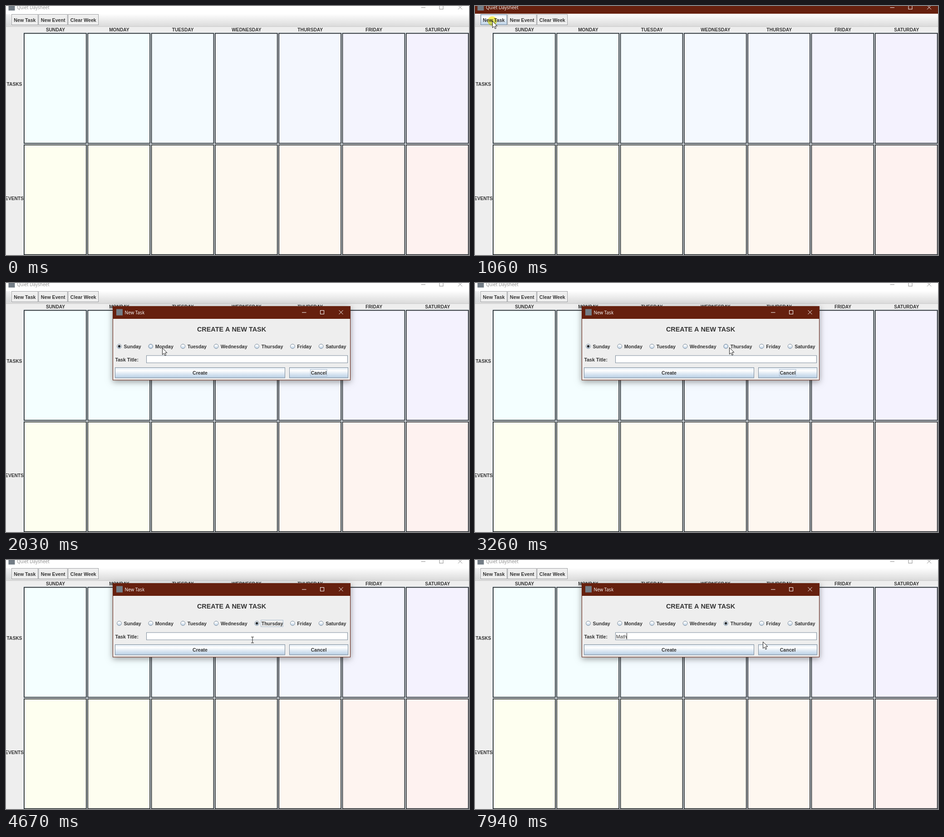
Recreate the animation shown at these times as an HTML page with a canvas. Size 1020x549 px, loop 8 s.

```html
<!DOCTYPE html>
<html lang="en">
<head>
<meta charset="utf-8">
<title>Weekly planner</title>
<style>
  html, body { margin: 0; width: 100%; height: 100%; overflow: hidden; background: #eee; }
  canvas { display: block; width: 1020px; height: 549px; }
</style>
</head>
<body>
<canvas id="stage"></canvas>
<script>
const W = 1020, H = 549, LOOP = 8000;
const canvas = document.getElementById('stage');
const ctx = canvas.getContext('2d');
const dpr = window.devicePixelRatio || 1;
canvas.width = W * dpr;
canvas.height = H * dpr;

const SANS = '"Liberation Sans", Arial, sans-serif';
const BOLD = 'bold 10.6px ' + SANS;
const CAPS = 'bold 10.2px ' + SANS;
const HEADING = 'bold 14.4px ' + SANS;
const PLAIN = '10.6px ' + SANS;
const TITLE = '10px "Open Sans", "Noto Sans", sans-serif';
const INK = '#333', EDGE = '#7a8a99', FACE = '#eee', BAR = '#66200e', FOCUS = '#a9bccf';
const DAYS = ['Sunday', 'Monday', 'Tuesday', 'Wednesday', 'Thursday', 'Friday', 'Saturday'];

// Pointer moves: start and end time, then where it goes
const ENTRY = { x: 975, y: 570 };
const MOVES = [
  { start: 190, end: 990, x: 38, y: 33 },
  { start: 1350, end: 1890, x: 344, y: 143 },
  { start: 2290, end: 2830, x: 537, y: 143 },
  { start: 3050, end: 3260, x: 560, y: 142 },
  { start: 3310, end: 3580, x: 582, y: 137 },
  { start: 3730, end: 4000, x: 461, y: 137 },
  { start: 4330, end: 4470, x: 598, y: 127 },
  { start: 4540, end: 4670, x: 543, y: 176 },
  { start: 5060, end: 5330, x: 634, y: 180 }
];
const STEP = 72;
const OPEN = 1160, PICK = 3380, ENTER = 4870, TYPE = 7360;
const PRESSES = [OPEN - 100, PICK, ENTER];
const PRESS_TIME = 95;

const pressed = (t, at) => t >= at && t < at + (at < OPEN ? 100 : PRESS_TIME);
const mix = (a, b, p) => a + (b - a) * p;
const smooth = p => p * p * (3 - 2 * p);

function pointer(t) {
  let pos = ENTRY;
  for (const m of MOVES) {
    if (t < m.start) break;
    const n = Math.round((m.end - m.start) / STEP);
    const k = Math.min(n, Math.floor((t - m.start) / (m.end - m.start) * n + 0.01));
    const p = (k + 1) / (n + 1);
    const e = (p + smooth(p)) / 2;
    pos = { x: mix(pos.x, m.x, e), y: mix(pos.y, m.y, e) };
  }
  return pos;
}

const inside = (p, x, y, w, h) => p.x >= x && p.x <= x + w && p.y >= y && p.y <= y + h;

function rect(x, y, w, h, fill) {
  ctx.fillStyle = fill;
  ctx.fillRect(x, y, w, h);
}

function frame(x, y, w, h, color, width = 1) {
  ctx.strokeStyle = color;
  ctx.lineWidth = width;
  ctx.strokeRect(x, y, w, h);
}

function disc(x, y, r, fill) {
  ctx.beginPath();
  ctx.arc(x, y, r, 0, Math.PI * 2);
  ctx.fillStyle = fill;
  ctx.fill();
}

function ring(x, y, r, color, width = 1) {
  ctx.beginPath();
  ctx.arc(x, y, r, 0, Math.PI * 2);
  ctx.strokeStyle = color;
  ctx.lineWidth = width;
  ctx.stroke();
}

function line(x1, y1, x2, y2, color) {
  ctx.strokeStyle = color;
  ctx.lineWidth = 1;
  ctx.beginPath();
  ctx.moveTo(x1, y1);
  ctx.lineTo(x2, y2);
  ctx.stroke();
}

function text(s, x, y, font, color = INK, align = 'left') {
  ctx.font = font;
  ctx.fillStyle = color;
  ctx.textAlign = align;
  ctx.fillText(s, x, y);
}

function widthOf(s, font) {
  ctx.font = font;
  return ctx.measureText(s).width;
}

function gradient(y1, y2, stops) {
  const g = ctx.createLinearGradient(0, y1, 0, y2);
  for (const at in stops) g.addColorStop(+at, stops[at]);
  return g;
}

const glossy = (y1, y2) =>
  gradient(y1, y2, { 0: '#dde8f3', 0.3: '#fff', 0.6: '#dde8f3', 1: '#b8cfe5' });

function caption(x, y, label, right, color) {
  rect(x, y - 7, 14, 14, '#737d86');
  text(label, x + 18.5, y + 4, TITLE, color);
  line(right - 86, y + 0.5, right - 76.5, y + 0.5, color);
  frame(right - 45.5, y - 4, 8, 8, color);
  line(right - 4.5, y - 4.5, right + 4.5, y + 4.5, color);
  line(right + 4.5, y - 4.5, right - 4.5, y + 4.5, color);
}

function toolbar(cur) {
  rect(0, 17, W, 28, gradient(17, 45, { 0: '#fff', 1: '#dadada' }));
  rect(0, 45, W, 1, '#ccc');
  for (let row = 0; row < 14; row++) {
    for (let x = (row % 2) * 1.8; x < 10; x += 3.6) {
      const y = 18.5 + row * 1.8;
      rect(x, y, 1, 1, '#a3aab2');
      rect(x + 0.9, y + 0.9, 0.9, 0.9, '#fff');
    }
  }
  let x = 12.5;
  for (const label of ['New Task', 'New Event', 'Clear Week']) {
    const w = widthOf(label, BOLD) + 9.7;
    const hot = inside(cur, x, 18, w, 24);
    rect(x, 18.5, w, 23, hot ? glossy(18, 42) : FACE);
    frame(x + 1, 19.5, w - 2, 21, hot ? '#b8cfe5' : '#f8f8f8');
    frame(x, 18.5, w, 23, hot ? EDGE : '#999b9e');
    text(label, x + w / 2, 35, BOLD, INK, 'center');
    x += w + 1.7;
  }
}

function cell(x, y, h, fill) {
  rect(x - 1, y - 1, 141, h + 2, '#e6eef4');
  rect(x, y, 138.8, h, fill);
  frame(x + 0.9, y + 0.9, 137, h - 1.8, '#23292d', 1.8);
}

function week() {
  DAYS.forEach((day, i) => {
    const x = 39 + 140.3 * i, p = i / 6;
    text(day.toUpperCase(), x + 70, 56, CAPS, INK, 'center');
    cell(x, 59.4, 244.2, `rgb(244, ${mix(256, 242, p)}, ${mix(255, 254, p)})`);
    cell(x, 305.4, 243.8, `rgb(254, ${mix(256, 242, p)}, 240)`);
  });
  text('TASKS', 18.5, 176, CAPS, INK, 'center');
  text('EVENTS', 18.5, 428, CAPS, INK, 'center');
}

function radio(x, y, on, hot) {
  disc(x, y, 4.9, glossy(y - 5, y + 5));
  if (hot) ring(x, y, 3.7, '#b8cfe5', 1.5);
  ring(x, y, 4.9, EDGE);
  if (on) disc(x, y, 2.8, '#262a2e');
}

function dayChoice(t, cur) {
  const chosen = DAYS[t < PICK + PRESS_TIME ? 0 : 4];
  let x = 249.5;
  for (const day of DAYS) {
    const w = widthOf(day, BOLD);
    radio(x, 139.6, day === chosen, inside(cur, x - 7, 131, w + 17, 18));
    text(day, x + 10, 144, BOLD);
    if (day === 'Thursday' && t >= PICK && t < ENTER) frame(x + 9, 132.5, w + 1, 14.5, FOCUS);
    x += w + 31;
  }
}

function pushButton(label, x, w) {
  rect(x, 186, w, 23.5, glossy(186, 209.5));
  frame(x + 0.5, 186.5, w - 1, 22.5, EDGE);
  text(label, x + w / 2, 202, BOLD, INK, 'center');
}

function titleField(t) {
  text('Task Title:', 240.5, 172.5, BOLD);
  rect(309, 159.5, 444, 17, '#fff');
  frame(309.5, 160, 443, 16, EDGE);

  const pause = 330, beat = 125;
  const rest = t - TYPE - pause;
  const count = t < TYPE ? 0 : rest < 0 ? 1 : 2 + Math.floor(rest / beat);
  const word = 'Math'.slice(0, count);
  text(word, 310.8, 172.5, PLAIN);

  const blink = Math.floor((t - ENTER) / 505) % 2 === 0;
  if (t >= TYPE || (t >= ENTER && blink)) {
    rect(Math.round(310.7 + widthOf(word, PLAIN)), 161, 1, 14, INK);
  }
}

function dialog(t, cur) {
  ctx.save();
  ctx.shadowColor = 'rgba(0,0,0,.4)';
  ctx.shadowBlur = 13 * dpr;
  ctx.shadowOffsetY = 3 * dpr;
  rect(235, 51, 524, 163.5, BAR);
  ctx.restore();
  rect(236, 79, 522, 134.5, FACE);
  caption(243, 64.5, 'New Task', 738, '#fff');
  text('CREATE A NEW TASK', 497, 107, HEADING, INK, 'center');
  dayChoice(t, cur);
  titleField(t);
  pushButton('Create', 240, 375);
  pushButton('Cancel', 624, 130);
  if (t < PICK) frame(670.5, 190.5, 36.5, 15, FOCUS);
}

function arrow(x, y) {
  const pts = [[0, 0], [0, 14.6], [3.4, 11.5], [5.7, 16.7], [8, 15.7], [5.8, 10.6], [10.4, 10.5]];
  ctx.beginPath();
  pts.forEach(([px, py]) => ctx.lineTo(x + 0.5 + px, y + 0.4 + py));
  ctx.closePath();
  ctx.fillStyle = '#fff';
  ctx.fill();
  ctx.strokeStyle = '#111';
  ctx.lineWidth = 0.95;
  ctx.stroke();
}

function beam(x, y) {
  line(x, y - 6, x, y + 6.5, '#222');
  for (const end of [y - 6.2, y + 6.7]) line(x - 3, end, x + 3, end, '#222');
}

function draw(t) {
  ctx.setTransform(dpr, 0, 0, dpr, 0, 0);
  const cur = pointer(t);
  const active = pressed(t, PRESSES[0]);
  rect(0, 0, W, H, FACE);
  rect(0, 0, W, 17, active ? BAR : '#fff');
  caption(5.5, 3, 'Quiet Daysheet', 1000.5, active ? '#fff' : '#8c8c8c');
  toolbar(cur);
  week();
  if (t >= OPEN) dialog(t, cur);

  if (PRESSES.some(at => pressed(t, at))) {
    ctx.globalCompositeOperation = 'multiply';
    disc(cur.x, cur.y, 10.3, '#fdf45e');
    ctx.globalCompositeOperation = 'source-over';
  }
  const overField = t >= OPEN && inside(cur, 309, 159, 444, 18);
  (overField ? beam : arrow)(cur.x, cur.y);
}

const began = performance.now();
function tick() {
  draw((performance.now() - began) % LOOP);
  requestAnimationFrame(tick);
}
tick();
</script>
</body>
</html>
```
